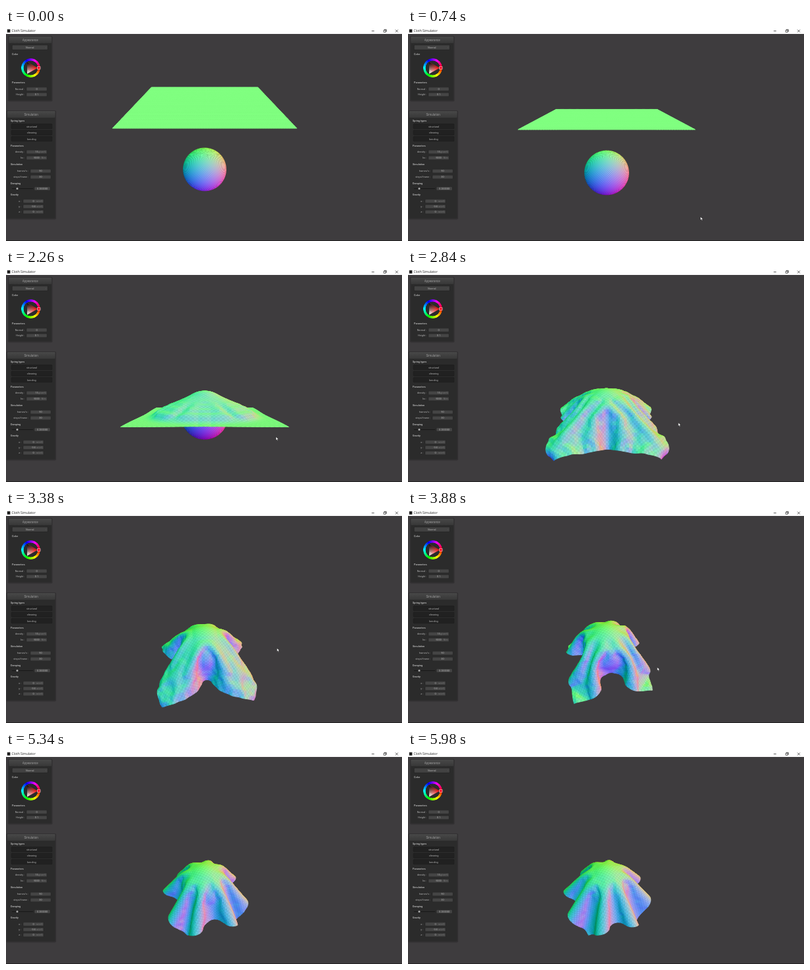
Recreate the animation shown at these times as an HTML page with a canvas. Size 600 by 323 pixels, loop 6 s.

```html
<!DOCTYPE html>
<html lang="en">
<head>
<meta charset="utf-8">
<title>Cloth Simulator</title>
<style>
html, body { margin: 0; width: 100%; height: 100%; overflow: hidden; background: #3e3c3e; }
canvas, svg { position: absolute; left: 0; top: 0; }
#wheel {
  position: absolute; left: 23px; top: 46px; width: 29px; height: 29px; border-radius: 50%;
  background: conic-gradient(from 90deg, red, yellow, lime, cyan, blue, magenta, red);
  -webkit-mask: radial-gradient(circle, transparent 10.6px, #000 11.2px);
  mask: radial-gradient(circle, transparent 10.6px, #000 11.2px);
}
text { font-family: Roboto, "Open Sans", sans-serif; font-size: 3.8px; fill: #b4b4b4; }
.head { font-size: 4.5px; fill: #9c9c9c; }
.bold { font-weight: 500; fill: #c4c4c4; }
.dim { fill: #777; font-size: 3.4px; }
.title { font-size: 5px; fill: #222; font-family: "Open Sans", sans-serif; }
</style>
</head>
<body>
<canvas id="stage" width="600" height="323"></canvas>
<svg id="ui" width="600" height="323" viewBox="0 0 600 323"></svg>
<div id="wheel"></div>
<svg width="600" height="323" viewBox="0 0 600 323">
  <defs>
    <linearGradient id="tint" gradientUnits="userSpaceOnUse" x1="48" y1="60.5" x2="32" y2="69.6">
      <stop stop-color="#f00"/><stop offset="1" stop-color="#fff"/>
    </linearGradient>
    <linearGradient id="shade" gradientUnits="userSpaceOnUse" x1="40" y1="65" x2="32" y2="51.4">
      <stop stop-color="#000" stop-opacity="0"/><stop offset="1"/>
    </linearGradient>
  </defs>
  <path d="M48 60.5L32 69.6V51.4Z" fill="url(#tint)"/>
  <path d="M48 60.5L32 69.6V51.4Z" fill="url(#shade)"/>
  <circle cx="34" cy="66" r="1.4" fill="none" stroke="#ddd" stroke-width=".5"/>
  <rect x="47.6" y="58.8" width="4.4" height="3.4" fill="#f02" stroke="#e8e8e8" stroke-width=".6"/>
  <path id="cursor" d="M0 0V5.2L1.3 4.1L2.2 6.1L3.1 5.7L2.2 3.8H3.9Z" fill="#fff" stroke="#111" stroke-width=".4"/>
</svg>
<script>
// ---------- window and panels ----------
const rect = (x, y, w, h, fill, extra = '') =>
  `<rect x="${x}" y="${y}" width="${w}" height="${h}" fill="${fill}" ${extra}/>`;
const label = (x, y, s, cls = '', anchor = 'start') =>
  `<text x="${x}" y="${y + 1.4}" class="${cls}" text-anchor="${anchor}">${s}</text>`;
const panel = (x, y, w, h, title) =>
  rect(x - 1.5, y - 1, w + 3, h + 3, '#000', 'rx="2" opacity=".2"') +
  rect(x, y, w, h, '#2b2b2b', 'rx="1.2"') +
  rect(x, y, w, 10, 'url(#bar)', 'rx="1.2"') +
  label(x + w / 2, y + 5.2, title, 'head', 'middle');
const button = (y, s, x = 8.3, w = 61.4, fill = '#212121') =>
  rect(x, y, w, 7.2, fill, 'rx="1" stroke="#191919" stroke-width=".4"') +
  label(x + w / 2, y + 3.8, s, '', 'middle');
const field = (y, name, value, x, unit = '', w = 31) =>
  label(x - 3, y, name, '', 'end') +
  rect(x, y - 2.7, w, 5.4, '#454545', 'rx=".8" stroke="#222" stroke-width=".4"') +
  label(x + w / 2, y, value, '', 'middle') +
  label(x + w - 1.5, y, unit, 'dim', 'end');

document.getElementById('ui').innerHTML = `
  <defs><linearGradient id="bar" x2="0" y2="1">
    <stop stop-color="#484848"/><stop offset="1" stop-color="#383838"/></linearGradient></defs>` +
  rect(0, 0, 600, 9, '#fff') + rect(1.8, 2, 4.6, 4.8, '#222') +
  label(8.5, 4.6, 'Cloth Simulator', 'title') +
  `<g fill="none" stroke="#222" stroke-width=".7"><path d="M554 4.5h4M590 2.5l4 4M594 2.5l-4 4"/>
   <path d="M572.3 3.3h3v3h-3zM573.3 3.3v-1h3v3h-1"/></g>` +
  rect(0, 322, 600, 1, '#222') +
  panel(4.3, 13, 64.7, 96.5, 'Appearance') +
  button(25.8, 'Normal', 9.3, 54, '#424242') + label(60, 29.5, '›', 'dim') +
  label(9, 40, 'Color', 'bold') + label(9, 83, 'Parameters', 'bold') +
  field(92.5, 'Normal :', '0', 31) + field(101, 'Height :', '0.1', 31) +
  panel(1.8, 126, 72.7, 162.5, 'Simulation') +
  label(7, 141, 'Spring types', 'bold') +
  button(145.5, 'structural') + button(155, 'shearing') + button(164.5, 'bending') +
  label(7, 179, 'Parameters', 'bold') +
  field(188, 'density :', '15', 31, 'g/cm^2') + field(197, 'ks :', '5000', 31, 'N/m') +
  label(7, 207, 'Simulation', 'bold') +
  field(217, 'frames/s :', '90', 37) + field(226, 'steps/frame :', '30', 37) +
  label(7, 236, 'Damping', 'bold') +
  rect(9, 243, 32, 1.1, '#191919') + '<circle cx="17" cy="243.5" r="1.5" fill="#aaa"/>' +
  field(243.5, '', '0.200000', 43, '', 24) +
  label(7, 253, 'Gravity', 'bold') +
  field(262.5, 'x :', '0', 26, 'm/s^2') + field(270.8, 'y :', '-9.8', 26, 'm/s^2') +
  field(279, 'z :', '0', 26, 'm/s^2');

// ---------- motion curves ----------
// Monotone cubic through rows of [time, a, b, ...]
function curve(rows) {
  const slope = (i, c) => (rows[i + 1][c] - rows[i][c]) / (rows[i + 1][0] - rows[i][0]);
  const tangent = (i, c) => {
    if (i === 0 || i === rows.length - 1) return 0;
    const a = slope(i - 1, c), b = slope(i, c);
    return a * b <= 0 ? 0 : 2 * a * b / (a + b);
  };
  return t => {
    let i = 0;
    while (i < rows.length - 2 && t > rows[i + 1][0]) i++;
    const [p, q] = [rows[i], rows[i + 1]], h = q[0] - p[0];
    const k = Math.min(1, Math.max(0, (t - p[0]) / h)), m = 1 - k;
    return p.slice(1).map((v, n) =>
      v * (1 + 2 * k) * m * m + q[n + 1] * (3 - 2 * k) * k * k +
      h * k * m * (tangent(i, n + 1) * m - tangent(i + 1, n + 1) * k));
  };
}
const RAD = Math.PI / 180;
// pitch, yaw in degrees
const camera = curve([[0, 25, 0], [200, 25, 0], [1200, 4.6, 0], [1400, 4.6, 0], [1900, -1, 0],
  [2400, -1, 0], [3000, 25, 2], [3380, 33, 5], [3750, 38, 9], [4300, 43, 15], [6000, 43, 15]]);
// playback ms to simulated seconds
const simTime = curve([[-1000, -.24], [0, 0], [1400, .335], [2260, .49], [3380, .69],
  [4400, .87], [5340, 1.06], [6000, 1.22], [7000, 1.4]]);
const pointer = curve([[200, 424, 323], [600, 436, 297], [900, 449, 275], [1250, 450, 260], [1400, 450, 258],
  [1680, 447, 271], [1840, 430, 264], [1900, 424, 255], [2260, 409, 254.5], [2500, 409, 250],
  [3380, 410.5, 209.5], [3700, 382, 222], [4340, 372, 280]]);
const leave = curve([[4350, 410, 297], [4400, 410, 300], [4950, 413, 323]]);

// ---------- cloth physics ----------
const BALL_Y = -.3, BALL_R = .2, START_Y = .288, GRAVITY = 9.8;
const P = 36, GAP = 1 / (P - 1), STEPS = 20, DT = 1 / (90 * STEPS), KEEP = .997, DRAG = (1 - KEEP) / DT;
const fallen = t => GRAVITY / DRAG * (t - (1 - Math.exp(-DRAG * t)) / DRAG);
const SAVE = 4, SPAN = 1.24;
let contact = 0;
while (START_Y - fallen(contact) > BALL_Y + BALL_R) contact += DT;

function flatCloth(y) {
  const p = new Float64Array(P * P * 3);
  for (let j = 0, o = 0; j < P; j++) for (let i = 0; i < P; i++, o += 3) {
    p[o] = i * GAP - .5; p[o + 1] = y; p[o + 2] = j * GAP - .5;
  }
  return p;
}

function makeSprings() {
  const list = [];
  const link = (i, j, di, dj, k) => {
    const x = i + di, y = j + dj;
    if (x >= 0 && x < P && y >= 0 && y < P)
      list.push({ a: (j * P + i) * 3, b: (y * P + x) * 3, rest: Math.hypot(di, dj) * GAP, k });
  };
  for (let j = 0; j < P; j++) for (let i = 0; i < P; i++) {
    link(i, j, -1, 0, 5000); link(i, j, 0, -1, 5000);
    link(i, j, -1, -1, 5000); link(i, j, 1, -1, 5000);
    link(i, j, -2, 0, 1000); link(i, j, 0, -2, 1000);
  }
  return list;
}

// Keeps layers apart, using a hash of coarse cells
const head = new Int32Array(4096), next = new Int32Array(P * P);
function selfCollide(p) {
  const cell = 3 * GAP, apart = .026;
  head.fill(-1);
  const keys = next.map((_, n) => {
    const at = c => Math.floor(p[n * 3 + c] / cell) + 64;
    return (at(0) * 73 + at(1) * 1531 + at(2) * 367) & 4095;
  });
  for (let n = 0; n < P * P; n++) { next[n] = head[keys[n]]; head[keys[n]] = n; }
  for (let n = 0; n < P * P; n++) {
    const o = n * 3;
    let cx = 0, cy = 0, cz = 0, hits = 0;
    for (let m = head[keys[n]]; m >= 0; m = next[m]) {
      const q = m * 3, x = p[o] - p[q], y = p[o + 1] - p[q + 1], z = p[o + 2] - p[q + 2];
      const d2 = x * x + y * y + z * z;
      if (d2 === 0 || d2 >= apart * apart) continue;
      const f = apart / Math.sqrt(d2) - 1;
      cx += x * f; cy += y * f; cz += z * f; hits++;
    }
    if (!hits) continue;
    hits *= STEPS;
    p[o] += cx / hits; p[o + 1] += cy / hits; p[o + 2] += cz / hits;
  }
}

function simulate() {
  const p = flatCloth(START_Y - fallen(contact));
  const last = flatCloth(START_Y - fallen(contact - DT));
  const size = p.length, force = new Float64Array(size), springs = makeSprings();
  const mass = 15 / (P * P), friction = .3, saved = [];
  const total = Math.ceil((SPAN - contact) / DT);
  for (let step = 0; step <= total; step++) {
    if (step % SAVE === 0) saved.push(Float32Array.from(p));
    force.fill(0);
    for (const { a, b, rest, k } of springs) {
      const x = p[b] - p[a], y = p[b + 1] - p[a + 1], z = p[b + 2] - p[a + 2];
      const f = k * (1 - rest / Math.sqrt(x * x + y * y + z * z));
      force[a] += f * x; force[a + 1] += f * y; force[a + 2] += f * z;
      force[b] -= f * x; force[b + 1] -= f * y; force[b + 2] -= f * z;
    }
    for (let o = 0; o < size; o++) {
      const now = p[o], pull = o % 3 === 1 ? GRAVITY : 0;
      p[o] += KEEP * (now - last[o]) + (force[o] / mass - pull) * DT * DT;
      last[o] = now;
    }
    selfCollide(p);
    for (let o = 0; o < size; o += 3) {
      const x = p[o], y = p[o + 1] - BALL_Y, z = p[o + 2], d = Math.sqrt(x * x + y * y + z * z);
      if (d >= BALL_R) continue;
      const s = BALL_R / d, slip = 1 - friction;
      p[o] = last[o] + slip * (x * s - last[o]);
      p[o + 1] = last[o + 1] + slip * (BALL_Y + y * s - last[o + 1]);
      p[o + 2] = last[o + 2] + slip * (z * s - last[o + 2]);
    }
    for (const { a, b, rest } of springs) {
      const x = p[b] - p[a], y = p[b + 1] - p[a + 1], z = p[b + 2] - p[a + 2];
      const d = Math.sqrt(x * x + y * y + z * z);
      if (d <= rest * 1.1) continue;
      const f = (1 - rest * 1.1 / d) / 2;
      p[a] += f * x; p[a + 1] += f * y; p[a + 2] += f * z;
      p[b] -= f * x; p[b + 1] -= f * y; p[b + 2] -= f * z;
    }
  }
  return saved;
}
const poses = simulate();

function clothAt(time) {
  if (time <= contact) return flatCloth(START_Y - fallen(Math.max(0, time)));
  const f = Math.min(poses.length - 1.001, (time - contact) / DT / SAVE), n = Math.floor(f);
  const a = poses[n], b = poses[n + 1];
  return a.map((v, o) => v + (b[o] - v) * (f - n));
}

// ---------- drawing ----------
const FOCAL = 345, CX = 301, CY = 166, DIST = 1.81, DRAWN_R = BALL_R * .92;
const M = 2 * P - 1;
const ctx = document.getElementById('stage').getContext('2d');
const ballCanvas = document.createElement('canvas');
ballCanvas.width = ballCanvas.height = 84;
const ballCtx = ballCanvas.getContext('2d');
const pos = new Float32Array(M * M * 3), scr = new Float32Array(M * M * 3);
const tone = (n, k) => Math.round((n + 1) * 127.5 * k);

// Doubles the mesh with a smooth four-point rule
function refine(src) {
  for (let j = 0; j < P; j++) for (let i = 0; i < P; i++) for (let c = 0; c < 3; c++)
    pos[(2 * j * M + 2 * i) * 3 + c] = src[(j * P + i) * 3 + c];
  const fill = (line, stride) => {
    for (let k = 1; k < M; k += 2) for (let c = 0; c < 3; c++) {
      const at = n => pos[line + Math.min(M - 1, Math.max(0, n)) * stride + c];
      const inner = k > 1 && k < M - 2;
      pos[line + k * stride + c] = inner
        ? (9 * (at(k - 1) + at(k + 1)) - at(k - 3) - at(k + 3)) / 16
        : (at(k - 1) + at(k + 1)) / 2;
    }
  };
  for (let j = 0; j < M; j += 2) fill(j * M * 3, 3);
  for (let i = 0; i < M; i++) fill(i * 3, M * 3);
}

function view(t) {
  const [pitch, yaw] = camera(t).map(a => a * RAD);
  const sp = Math.sin(pitch), cp = Math.cos(pitch), sy = Math.sin(yaw), cy = Math.cos(yaw);
  const project = (x, y, z) => {
    const near = z * cy - x * sy, depth = DIST - y * sp - near * cp;
    return [CX + FOCAL * (x * cy + z * sy) / depth, CY - FOCAL * (y * cp - near * sp) / depth, depth];
  };
  return { pitch, sy, cy, project };
}

function drawBall(cam) {
  const [x0, y0, depth] = cam.project(0, BALL_Y, 0);
  const r = FOCAL * DRAWN_R / Math.sqrt(depth * depth - DRAWN_R * DRAWN_R);
  const tilt = cam.pitch + Math.atan((y0 - CY) / FOCAL), s = Math.sin(tilt), c = Math.cos(tilt);
  const left = Math.floor(x0) - 42, top = Math.floor(y0) - 42;
  const img = ballCtx.createImageData(84, 84);
  for (let j = 0, o = 0; j < 84; j++) for (let i = 0; i < 84; i++, o += 4) {
    const x = (left + i + .5 - x0) / r, y = (y0 - top - j - .5) / r, d = Math.hypot(x, y);
    const alpha = Math.min(1, Math.max(0, (1 - d) * r + .5));
    if (!alpha) continue;
    const z = Math.sqrt(Math.max(0, 1 - d * d)), ny = y * c + z * s, near = z * c - y * s;
    const nx = x * cam.cy - near * cam.sy, nz = x * cam.sy + near * cam.cy;
    const lat = Math.asin(Math.max(-1, Math.min(1, ny))), lon = Math.atan2(nx, nz);
    const dots = .95 + .1 * Math.sin(lat * 75) * Math.sin(lon * 60);
    img.data.set([tone(nx, dots), tone(ny, dots), tone(nz, dots), alpha * 255], o);
  }
  ballCtx.putImageData(img, 0, 0);
  ctx.drawImage(ballCanvas, left, top);
}

function drawScene(t) {
  const cam = view(t), time = simTime(t)[0];
  const grain = .07 * Math.min(1, Math.max(0, time - contact) * 8);
  refine(clothAt(time));
  for (let o = 0; o < pos.length; o += 3) scr.set(cam.project(pos[o], pos[o + 1], pos[o + 2]), o);
  const items = [[cam.project(0, BALL_Y, 0)[2] + .02, -1]];
  for (let j = 0; j < M - 1; j++) for (let i = 0; i < M - 1; i++) {
    const a = (j * M + i) * 3, d = a + (M + 1) * 3;
    items.push([(scr[a + 2] + scr[d + 2]) / 2, a, (i + j) & 1]);
  }
  items.sort((p, q) => q[0] - p[0]);

  ctx.fillStyle = '#3e3c3e';
  ctx.fillRect(0, 0, 600, 323);
  ctx.lineWidth = .9;
  ctx.lineJoin = 'round';
  for (const [, a, odd] of items) {
    if (a < 0) { drawBall(cam); continue; }
    const b = a + 3, c = a + M * 3, d = c + 3;
    const px = pos[d] - pos[a], py = pos[d + 1] - pos[a + 1], pz = pos[d + 2] - pos[a + 2];
    const qx = pos[c] - pos[b], qy = pos[c + 1] - pos[b + 1], qz = pos[c + 2] - pos[b + 2];
    const nx = qy * pz - qz * py, ny = qz * px - qx * pz, nz = qx * py - qy * px;
    const len = Math.hypot(nx, ny, nz) || 1, k = 1 - grain * odd;
    ctx.fillStyle = ctx.strokeStyle =
      `rgb(${tone(nx / len, k)},${tone(ny / len, k)},${tone(nz / len, k)})`;
    ctx.beginPath();
    for (const o of [a, b, d, c]) ctx.lineTo(scr[o], scr[o + 1]);
    ctx.closePath();
    ctx.fill();
    ctx.stroke();
  }
}

const cursor = document.getElementById('cursor');
const start = performance.now();
function frame() {
  const t = (performance.now() - start) % 6000;
  drawScene(t);
  const [x, y] = t < 4350 ? pointer(t) : leave(t);
  cursor.setAttribute('transform', `translate(${x} ${y})`);
  cursor.style.display = t > 200 && t < 4950 ? '' : 'none';
  requestAnimationFrame(frame);
}
frame();
</script>
</body>
</html>
```
